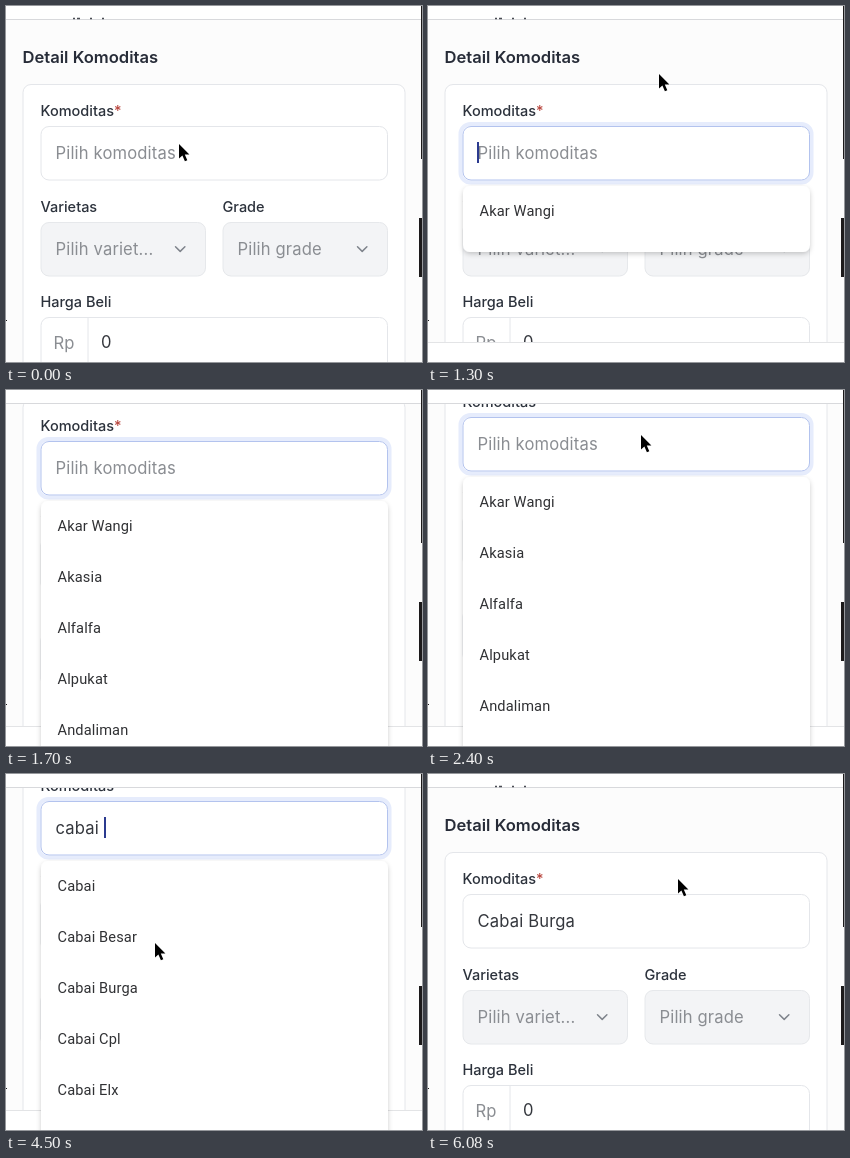
These frames come from a looping animation (416x356 px, 6260 ms). An HTML page:

```html
<!DOCTYPE html>
<html lang="id">
<head>
<meta charset="utf-8">
<title>Detail Komoditas</title>
<style>
  html, body { margin: 0; width: 100%; height: 100%; overflow: hidden; background: #fff; }
  svg { display: block; width: 416px; height: 356px; }
  text { font: 400 16.6px Inter, sans-serif; letter-spacing: .15px; fill: #8a8d92; white-space: pre; }
  .title { font-weight: 600; fill: #272c38; letter-spacing: 0; }
  .label { font-size: 14.5px; font-weight: 500; fill: #2c323c; letter-spacing: 0; }
  .value { fill: #34373d; }
  .item { font: 400 14.6px Roboto, sans-serif; letter-spacing: .14px; fill: #303134; }
  .box { fill: #fff; stroke: #e4e6ea; }
  .select { fill: #f3f4f6; stroke: #e6e8eb; }
  .chevron { fill: none; stroke: #7f848c; stroke-width: 1.5; stroke-linecap: round; stroke-linejoin: round; }
</style>
</head>
<body>
<svg viewBox="0 0 416 356">
  <defs>
    <clipPath id="page"><rect y="13" width="416" height="343"/></clipPath>
    <filter id="shadow" x="-10%" y="-10%" width="120%" height="130%">
      <feDropShadow dx="0" dy="2" stdDeviation="2.5" flood-color="#000" flood-opacity=".2"/>
    </filter>
  </defs>
  <rect width="416" height="356" fill="#fff"/>
  <rect y="13" width="416" height="343" fill="#fcfcfc"/>
  <g clip-path="url(#page)">
    <g class="scroll">
      <text class="title" x="16.5" y="57">Detail Komoditas</text>
      <rect class="box" x="17" y="78.5" width="382" height="400" rx="8"/>
      <text class="label" x="34.5" y="110">Komoditas<tspan fill="#b8453d">*</tspan></text>
      <rect id="ring" x="32.5" y="118" width="351" height="58.5" rx="10" fill="none" stroke="#e6ecfc" stroke-width="4"/>
      <rect id="field" class="box" x="35" y="120.5" width="346.5" height="53.5" rx="8"/>
      <text id="entry" x="49.5" y="153"></text>
      <rect id="caret" y="136" width="2" height="21" fill="#2b3a8f"/>
      <text class="label" x="34.5" y="206">Varietas</text>
      <text class="label" x="216.5" y="206">Grade</text>
      <rect class="select" x="35" y="216.5" width="164.5" height="53.5" rx="8"/>
      <rect class="select" x="217" y="216.5" width="164.5" height="53.5" rx="8"/>
      <text x="49.5" y="249">Pilih variet...</text>
      <text x="231.5" y="249">Pilih grade</text>
      <path class="chevron" d="M169.5 240.7l4.7 4.7 4.7-4.7M351.5 240.7l4.7 4.7 4.7-4.7"/>
      <text class="label" x="34.5" y="301">Harga Beli</text>
      <rect class="box" x="35" y="311.5" width="346.5" height="54" rx="8"/>
      <path d="M82 312v54" stroke="#e4e6ea"/>
      <text x="47.5" y="343">Rp</text>
      <text class="value" x="95" y="342">0</text>
    </g>
    <g id="footer">
      <rect y="336" width="416" height="20" fill="#fff"/>
      <path d="M0 336.5h416" stroke="#e3e4e6"/>
    </g>
    <g id="menu" class="scroll">
      <rect id="panel" x="35" y="180" width="347" rx="7" fill="#fff" filter="url(#shadow)"/>
      <g id="items"></g>
    </g>
  </g>
  <path d="M0 13.5h416" stroke="#d8d9dc"/>
  <path id="remnant" d="M67 12.5h2m2 0h3m10 0h2m10 0h2" stroke="#4a4d54" stroke-width="1.5"/>
  <path d="M415 0h1v153h-1zM413 212h3v59h-3zM0 314h1v1h-1z" fill="#1c1a1b"/>
  <path id="pointer" d="M0 0V14.6L3.4 11.5 5.9 17.3 8.3 16.2 5.8 10.6H10.4Z" fill="#000" stroke="#fff" stroke-width="1" paint-order="stroke"/>
</svg>
<script>
const LOOP = 6260;
const $ = id => document.getElementById(id);
const show = (el, on) => el.setAttribute('visibility', on ? 'visible' : 'hidden');

const pointerPath = [
  [200, 173, 138], [400, 174, 141], [600, 181, 134], [800, 206, 102], [1300, 231, 68],
  [1500, 234, 8], [1700, 231, -18], [1900, 230, -20], [2100, 213, 45], [2400, 213, 45],
  [2600, 169, 179], [4300, 169, 179], [4500, 149, 169], [4900, 143, 171], [5000, 143, 171],
  [5300, 122, 159], [5800, 122, 159], [6080, 250, 105]
];
const scrollPath = [
  [1400, 0], [1500, 14], [1600, 45], [1700, 69], [1900, 86], [2100, 93],
  [5500, 93], [5600, 70], [5700, 22], [5800, 0]
];
// time, text, caret x
const typing = [
  [0, '', 49], [3400, 'c', 59], [3500, 'ca', 69], [3600, 'caba', 88],
  [3800, 'cabai', 93], [4200, 'cabai ', 98], [5600, 'Cabai Burga', 0]
];
const cabai = ['Cabai', 'Cabai Besar', 'Cabai Burga', 'Cabai Cpl', 'Cabai Elx', 'Cabai Gendot'];
const lists = [
  [0, ['Akar Wangi']],
  [1500, ['Akar Wangi', 'Akasia', 'Alfalfa', 'Alpukat', 'Andaliman', '']],
  [4400, cabai],
  [5100, cabai.slice(1)]
];
const caretOff = [[1600, 2000], [2400, 2800], [4700, 5100]];

const latest = (steps, t) => steps.findLast(step => step[0] <= t);

function along(path, t) {
  const next = path.findIndex(key => key[0] > t);
  if (next < 0) return path.at(-1).slice(1);
  if (next === 0) return path[0].slice(1);
  const a = path[next - 1], b = path[next];
  const k = (t - a[0]) / (b[0] - a[0]);
  return a.slice(1).map((v, i) => v + (b[i + 1] - v) * k);
}

let shownList;
function setList(list) {
  if (list === shownList) return;
  shownList = list;
  $('items').replaceChildren(...list.map((name, i) => {
    const item = document.createElementNS('http://www.w3.org/2000/svg', 'text');
    item.setAttribute('class', 'item');
    item.setAttribute('x', 51.5);
    item.setAttribute('y', 210.3 + 51 * i);
    item.textContent = name;
    return item;
  }));
  $('panel').setAttribute('height', list.length * 51 + (list.length > 1 ? 12 : 15));
}

function draw(time) {
  const t = time >= 6080 ? 6080 : Math.min(5900, Math.floor(time / 100) * 100);
  const focused = t >= 400 && t < 5600;
  const [scroll] = along(scrollPath, t);
  const [, text, caretX] = latest(typing, t);

  for (const el of document.querySelectorAll('.scroll'))
    el.setAttribute('transform', `translate(0 ${-Math.round(scroll)})`);
  $('pointer').setAttribute('transform', `translate(${along(pointerPath, t).map(Math.round)})`);

  $('entry').textContent = text || 'Pilih komoditas';
  $('entry').setAttribute('class', text ? 'value' : '');
  $('caret').setAttribute('x', caretX);
  show($('caret'), focused && !caretOff.some(([from, to]) => t >= from && t < to));

  show($('ring'), focused);
  $('field').style.stroke = focused ? '#b3c3ee' : '';
  show($('footer'), focused);
  show($('menu'), t >= 500 && t < 5600);
  setList(latest(lists, t)[1]);
  show($('remnant'), scroll < 3);
}

const start = performance.now();
function tick() {
  draw((performance.now() - start) % LOOP);
  requestAnimationFrame(tick);
}
tick();
</script>
</body>
</html>
```
